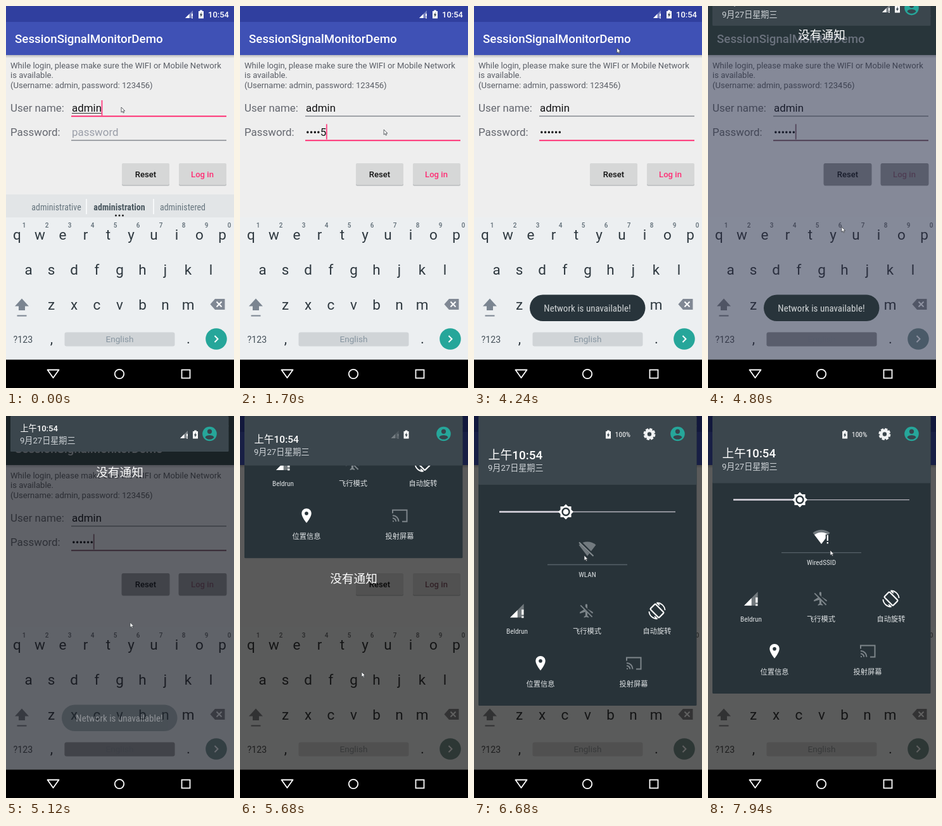
Recreate the animation shown at these times as an HTML page. Size 360 px wide and 600 px high, loop 7990 ms.

```html
<!DOCTYPE html>
<html lang="en">
<head>
<meta charset="utf-8">
<title>Login and quick settings</title>
<style>
  html, body { margin: 0; width: 100%; height: 100%; overflow: hidden; background: #000; }
  svg { display: block; width: 100%; height: 100%; }
  text { font-family: Roboto, "Noto Sans CJK SC", "Noto Sans CJK", sans-serif; }
  .mid { text-anchor: middle; }
  .cond { font-family: "Roboto Condensed", Roboto, "Noto Sans CJK SC", "Noto Sans CJK", sans-serif; font-stretch: 75%; }
  .info { font-size: 13.1px; fill: #5a5e66; }
  .label, .field { font-size: 16.9px; }
  .label { fill: #64676f; }
  .field { fill: #141416; }
  .btn { font-size: 13.1px; font-weight: 500; text-anchor: middle; }
  .sugg { font-size: 14px; fill: #66757e; text-anchor: middle; }
  .key { font-size: 22.5px; fill: #2f3940; text-anchor: middle; }
  .digit { font-size: 10px; font-weight: 500; fill: #5d6b75; text-anchor: middle; }
  .tile { font-size: 11.25px; fill: #dfe3e5; text-anchor: middle; }
  .cast { fill: #969696; opacity: var(--cast); }
  .title { font-size: 18.75px; font-weight: 500; fill: #fff; opacity: calc(1 - .35 * var(--cast)); }
</style>
</head>
<body>
<svg viewBox="0 0 360 600">
  <defs>
    <linearGradient id="drop" x2="0" y2="1">
      <stop stop-color="#000" stop-opacity=".25"/><stop offset="1" stop-color="#000" stop-opacity="0"/>
    </linearGradient>
    <clipPath id="bodyClip"><rect id="bodyBox" x="7" width="345"/></clipPath>
    <g id="signal">
      <path d="M0 12 12 0V12Z" fill="#fff" opacity=".35"/>
      <path d="M0 12 6.5 5.5V12Z" fill="#fff"/>
      <path d="M11 5V9.6M11 10.8V12.4" stroke="#fff" stroke-width="1.8"/>
    </g>
    <g id="battery">
      <path d="M-4-5H-1.8V-6.5H1.8V-5H4V6.5H-4Z" fill="#fff"/>
      <path d="M.8-3.5-2.2 1.6H-.4L-.8 5 2.2 0H.4Z" fill="#37444c"/>
    </g>
  </defs>

  <g id="screen">
    <g id="form">
      <rect width="360" height="556" fill="#eee"/>
      <text class="info" x="7" y="97.5">While login, please make sure the WIFI or Mobile Network</text>
      <text class="info" x="7" y="113">is available.</text>
      <text class="info" x="7" y="128.7">(Username: admin, password: 123456)</text>
      <text class="label" x="7" y="166">User name:</text>
      <text class="label" x="7" y="204">Password:</text>
      <text class="field" x="104" y="166">admin</text>
      <rect id="compose" x="104" y="168" width="47" height="1" fill="#333"/>
      <text class="field" id="hint" x="104" y="204" style="fill:#9a9ea8">password</text>
      <text class="field" id="pass" x="104" y="204"></text>
      <rect id="line1" x="103" width="245"/>
      <rect id="line2" x="103" width="245"/>
      <rect id="caret" width="1.8" height="24" fill="#ff4081"/>

      <rect x="183" y="248" width="75" height="34.5" rx="2" fill="#b9bbbd"/>
      <rect x="183" y="247" width="75" height="34" rx="2" fill="#d6d7d7"/>
      <rect class="cast" x="182.5" y="247" width="76" height="35" rx="3"/>
      <text class="btn" x="220.5" y="268.8" fill="#111">Reset</text>
      <rect x="273" y="248" width="75" height="34.5" rx="2" fill="#b9bbbd"/>
      <rect x="273" y="247" width="75" height="34" rx="2" fill="#d6d7d7"/>
      <rect id="press" x="273" y="247" width="75" height="34" rx="2" fill="#8d8f91"/>
      <rect class="cast" x="272.500" y="247" width="76" height="35" rx="3"/>
      <text class="btn" x="310" y="268.8" fill="#ff2d74">Log in</text>

      <g id="strip">
        <rect y="296" width="360" height="36" fill="#e2e5e7"/>
        <path d="M127 303V327M233 303V327" stroke="#f6f8f9" stroke-width="2"/>
        <text class="sugg cond" x="79.5" y="321">administrative</text>
        <text class="sugg cond" x="179" y="321" font-weight="700" style="fill:#4a5860">administration</text>
        <text class="sugg cond" x="279" y="321">administered</text>
        <path d="M173.500 329h0M179 329h0M184.500 329h0" stroke="#222" stroke-width="3" stroke-linecap="round"/>
      </g>

      <g id="keys">
        <rect y="332" width="360" height="224" fill="#eceff1"/>
        <path d="M25 459.500 36 471.500H30V478H20V471.500H14ZM17.500 485.500H32.500V487.500H17.500Z" fill="#7b8591"/>
        <path d="M322.500 468.500 330 460H345.500V477H330Z" fill="#808894"/>
        <path d="M332.500 464.500 340.500 472.500M340.500 464.500 332.500 472.500" stroke="#fff" stroke-width="2"/>
        <text x="11.500" y="528.500" font-size="14.2" fill="#455059">?123</text>
        <rect x="92.500" y="512.500" width="174" height="22" rx="3" fill="#d0d4d7"/>
        <rect class="cast" x="92.500" y="512.500" width="174" height="22" rx="3"/>
        <text class="mid" x="179.500" y="528" font-size="13.6" fill="#8796a1">English</text>
        <circle cx="332" cy="523" r="16.800" fill="#26a69a"/>
        <path d="M329.500 518 334.500 523 329.500 528" fill="none" stroke="#fff" stroke-width="2"/>
      </g>
    </g>

    <rect y="76" width="360" height="6" fill="url(#drop)"/>
    <rect y="25" width="360" height="52" fill="#3f51b5"/>
    <rect width="360" height="25" fill="#303f9f"/>
    <rect class="cast" width="360" height="77" style="fill:#324430"/>
    <use href="#signal" x="283" y="7"/>
    <use href="#battery" x="308" y="13"/>
    <text x="319" y="17.5" font-size="13" font-weight="500" fill="#fff">10:54</text>
    <text class="title" x="14" y="57.5">SessionSignalMonitorDemo</text>
  </g>

  <rect id="scrim" width="360" height="556"/>

  <g id="toast">
    <rect x="88" y="453.500" width="182.500" height="41.500" rx="20.700" fill="#28343b"/>
    <text class="mid cond" x="179" y="480" font-size="15" fill="#d0d4d6">Network is unavailable!</text>
  </g>

  <g id="shade">
    <text id="empty" class="mid" x="179.500" font-size="18.7" fill="#fff">没有通知</text>
    <rect id="panel" x="7" width="344.500" rx="1.500" fill="#283339"/>
    <g clip-path="url(#bodyClip)">
      <g id="body">
        <path d="M40 150.500H318" stroke="#b4b2bc" stroke-width="1.300"/>
        <path d="M40 150.500H145" stroke="#d8d4de" stroke-width="2.500"/>
        <g transform="translate(145 150.500)">
          <path d="M-8.500-8.500H8.500V8.500H-8.500ZM0-12 12 0 0 12-12 0Z" fill="#fff"/>
          <circle r="5.500" fill="#fff" stroke="#283339" stroke-width="2.400"/>
        </g>

        <circle id="ripple" cx="179" cy="212" fill="#fff"/>
        <g transform="translate(179 208)">
          <path d="M0 12-13.500-5.500A21 21 0 0 1 13.500-5.500Z" fill="#727a7f"/>
          <g id="wifiOff">
            <path d="M-12-10.500 10.500 12" stroke="#283339" stroke-width="4.500"/>
            <path d="M-13-9.500 9.500 12" stroke="#858c90" stroke-width="2"/>
          </g>
          <g id="wifiOn">
            <path d="M0 12-11-2.500A17.500 17.500 0 0 1 11-2.500Z" fill="#fff"/>
            <path d="M9.500-3V13" stroke="#283339" stroke-width="5.500"/>
            <path d="M9.800-2V7M9.800 9V11.500" stroke="#fff" stroke-width="2.200"/>
          </g>
        </g>
        <path d="M116 233.500H242" stroke="#566167" stroke-width="1.300"/>
        <text id="ssid" class="tile cond" x="179" y="253">WLAN</text>

        <use href="#signal" transform="translate(57 295) scale(1.800)"/>
        <text class="tile cond" x="68" y="342">Beldrun</text>

        <g transform="translate(165 293) scale(1.080)">
          <path d="M21 16v-2l-8-5V3.500C13 2.700 12.300 2 11.500 2S10 2.700 10 3.500V9l-8 5v2l8-2.500V19l-2 1.500V22l3.500-1 3.500 1v-1.500L13 19v-5.500l8 2.500z" fill="#7d858a"/>
          <path d="M4 3 21 20" stroke="#283339" stroke-width="4"/>
          <path d="M3 4 20 21" stroke="#7d858a" stroke-width="1.700"/>
        </g>
        <text class="tile cond" x="178.500" y="342">飞行模式</text>

        <g transform="translate(289 306)" fill="none" stroke="#fff">
          <rect x="-5.800" y="-9.800" width="11.600" height="19.600" rx="1.500" stroke-width="2.200" transform="rotate(-45)"/>
          <path id="arc" d="M-.5-12.600A12.600 12.600 0 0 1 12.600-1M-.5-12.600 4-8.800" stroke-width="1.800"/>
          <use href="#arc" transform="rotate(180)"/>
        </g>
        <text class="tile cond" x="289" y="342">自动旋转</text>

        <path d="M105 377c-4.300 0-7.700 3.400-7.700 7.700 0 5.800 7.700 15 7.700 15s7.700-9.200 7.700-15c0-4.300-3.400-7.700-7.700-7.700z" fill="#fff"/>
        <circle cx="105" cy="384.700" r="2.800" fill="#283339"/>
        <text class="tile cond" x="105" y="425">位置信息</text>

        <g transform="translate(252 388.500)" fill="none" stroke="#7d858a" stroke-width="2">
          <path d="M-11-4V-9H11.500V9H4M-11-.500A9.500 9.500 0 0 1-1.500 9M-11 3.700A5.300 5.300 0 0 1-5.700 9"/>
          <path d="M-11 7.200A2 2 0 0 1-9 9.500H-11Z" fill="#7d858a" stroke="none"/>
        </g>
        <text class="tile cond" x="252" y="425">投射屏幕</text>
      </g>
    </g>

    <rect id="head" x="7" width="344.500" rx="1.500" fill="#3b464d"/>
    <text id="clock" x="22.500" font-weight="500" fill="#fff">上午10:54</text>
    <text id="date" x="22" font-size="13.100" fill="#cfd4d8">9月27日星期三</text>
    <use id="headSignal" href="#signal" y="23"/>
    <use id="headBattery" href="#battery" y="29"/>
    <text id="percent" class="cond mid" y="33" font-size="11.500" fill="#fff">100%</text>
    <g id="gear" fill="none" stroke="#f0f2f3">
      <circle r="5.500" stroke-width="4.600"/>
      <circle r="8" stroke-width="3" stroke-dasharray="4.200 2.083"/>
    </g>
    <g transform="translate(321.500 28)">
      <circle r="11.300" fill="#26a69a"/>
      <circle cy="-3.700" r="3.600" fill="#37444c"/>
      <path d="M-7 5.500C-6 1 6 1 7 5.500A9 9 0 0 1-7 5.500Z" fill="#37444c"/>
    </g>
  </g>

  <rect y="555.500" width="360" height="45" fill="#000"/>
  <g fill="none" stroke="#fff" stroke-width="1.800">
    <path d="M65.500 571.500H83.500L74.500 584Z" stroke-linejoin="round"/>
    <circle cx="179" cy="578" r="7.200"/>
    <rect x="277.500" y="571.500" width="13" height="13"/>
  </g>
  <path id="cursor" d="M0 0V8L1.900 6.300 3.100 9 4.500 8.400 3.300 5.800H5.800Z" fill="#fff" stroke="#3a3f45" stroke-width=".8"/>
</svg>

<script>
const LOOP = 7990;
const $ = {};
document.querySelectorAll('[id]').forEach(el => $[el.id] = el);

const set = (el, attrs) => { for (const k in attrs) el.setAttribute(k, attrs[k]); };
const show = (el, on) => set(el, { visibility: on ? 'visible' : 'hidden' });
const clamp = v => Math.max(0, Math.min(1, v));
const span = (t, from, to) => clamp((t - from) / (to - from));
const move = (x, y) => ({ transform: `translate(${x} ${y})` });

// Linear interpolation through [time, value] stops
function track(t, stops) {
  let [t0, v0] = stops[0];
  for (const [t1, v1] of stops) {
    if (t < t1) return v0 + (v1 - v0) * span(t, t0, t1);
    [t0, v0] = [t1, v1];
  }
  return v0;
}

function addText(cls, x, y, str) {
  const el = document.createElementNS('http://www.w3.org/2000/svg', 'text');
  set(el, { class: cls, x, y });
  el.textContent = str;
  $.keys.append(el);
}
const addRow = (cls, x, y, chars) => [...chars].forEach((c, i) => addText(cls, x + i * 36, y, c));
addRow('key', 17.5, 367, 'qwertyuiop');
addRow('digit', 28.7, 347.5, '1234567890');
addRow('key', 35.5, 422, 'asdfghjkl');
addRow('key', 71.5, 477, 'zxcvbnm');
addText('key', 72, 530, ',');
addText('key', 288, 530, '.');

const FOCUS = 380, MASK = 3000;
const typed = [680, 820, 940, 1250, 1480, 1760];
const path = [
  [0, 182, 159], [1230, 182, 159], [1700, 227, 194], [2000, 267, 243], [2380, 309, 267],
  [3640, 309, 267], [4390, 205, 16], [4490, 206, 14], [4800, 211, 346], [4920, 206, 470],
  [5240, 190, 238], [5300, 190, 240], [5680, 192, 401], [5860, 192, 573], [6070, 190, 514],
  [6200, 188, 240], [6370, 188, 240], [6420, 174, 219], [6680, 174, 219], [6790, 177, 212],
  [7250, 177, 212], [7770, 190, 512], [7850, 192, 525], [7940, 193, 211]
];
const pathX = path.map(p => [p[0], p[1]]);
const pathY = path.map(p => [p[0], p[2]]);

function drawForm(t) {
  const inPass = t >= FOCUS;
  const count = typed.filter(at => t >= at).length;
  const masked = t >= MASK ? count : Math.max(0, count - 1);
  $.pass.textContent = '•'.repeat(masked) + '123456'.slice(masked, count);
  show($.hint, !count);
  show($.compose, !inPass);
  show($.strip, t < 400);

  const underline = (el, y, on) =>
    set(el, { y: on ? y - .8 : y - .5, height: on ? 2 : 1, fill: on ? '#ff3377' : '#555b64' });
  underline($.line1, 173, !inPass);
  underline($.line2, 211, inPass);

  const last = count > 5 ? 1720 : count ? typed[count - 1] : inPass ? FOCUS : 0;
  const width = count ? $.pass.getComputedTextLength() : 0;
  set($.caret, { x: inPass ? 103.6 + width : 150.6, y: inPass ? 185.5 : 148 });
  show($.caret, Math.floor((t - last) / 500) % 2 === 0);

  set($.press, { opacity: track(t, [[2980, 0], [3060, .4], [3120, .4], [3220, 0]]) });
  const fadeIn = 1 - (1 - span(t, 3050, 3520)) ** 1.5;
  set($.toast, { opacity: fadeIn * (1 - span(t, 4950, 5240)) });
}

// The scrim starts blue-grey and settles to black while colours drain from the form
function drawScrim(t) {
  const dim = track(t, [[4480, 0], [4800, .5], [5060, .62]]);
  const tint = 1 - span(t, 4900, 5240);
  set($.scrim, { opacity: dim, fill: `rgb(${30 * tint} ${38 * tint} ${68 * tint})` });
  $.form.style.filter = dim ? `grayscale(${Math.min(.8, dim * 1.7)})` : 'none';
  $.screen.style.setProperty('--cast', track(t, [[4490, 0], [4700, 1], [5100, 1], [5300, 0]]));
}

function drawShade(t) {
  const slide = track(t, [[4480, -56], [4800, -25], [5060, 0]]);
  const open = track(t, [[5280, 0], [5680, .417], [5860, .83], [6070, .94], [6200, 1], [7830, 1], [7940, .9525]]);
  const bottom = 56 + 399 * open;
  const head = 56 + 52 * open;
  const extras = clamp((open - .5) * 2.5);
  const shift = 87 * open;

  show($.shade, t >= 4480);
  set($.shade, move(0, slide));
  set($.panel, { height: bottom });
  set($.head, { height: head });
  set($.bodyBox, { y: head, height: Math.max(0, bottom - head) });
  set($.body, move(0, bottom - 455));
  set($.empty, { y: bottom + 38.5 + slide * .72, opacity: 1 - span(open, .6, .85) });
  set($.clock, { y: 24 + 43.5 * open, 'font-size': 13.1 + 5.8 * open });
  set($.date, { y: 42.5 + 43.5 * open });

  set($.headSignal, { x: 275 - shift, opacity: 1 - span(open, 0, .6) });
  set($.headBattery, { x: 299 - shift });
  set($.percent, { x: 322 - shift, opacity: extras });
  set($.gear, { ...move(317 - 40 * open, 28.5), opacity: extras });

  const wave = span(t, 6970, 7400);
  set($.ripple, { r: 46 * Math.sqrt(wave), opacity: wave > 0 ? .2 * (1 - wave) : 0 });
  show($.wifiOff, t < 7050);
  show($.wifiOn, t >= 7350);
  $.ssid.textContent = t < 7350 ? 'WLAN' : 'WiredSSID';
}

const start = performance.now();
function frame() {
  const t = (performance.now() - start) % LOOP;
  drawForm(t);
  drawScrim(t);
  drawShade(t);
  set($.cursor, move(track(t, pathX), track(t, pathY)));
  requestAnimationFrame(frame);
}
frame();
</script>
</body>
</html>
```
